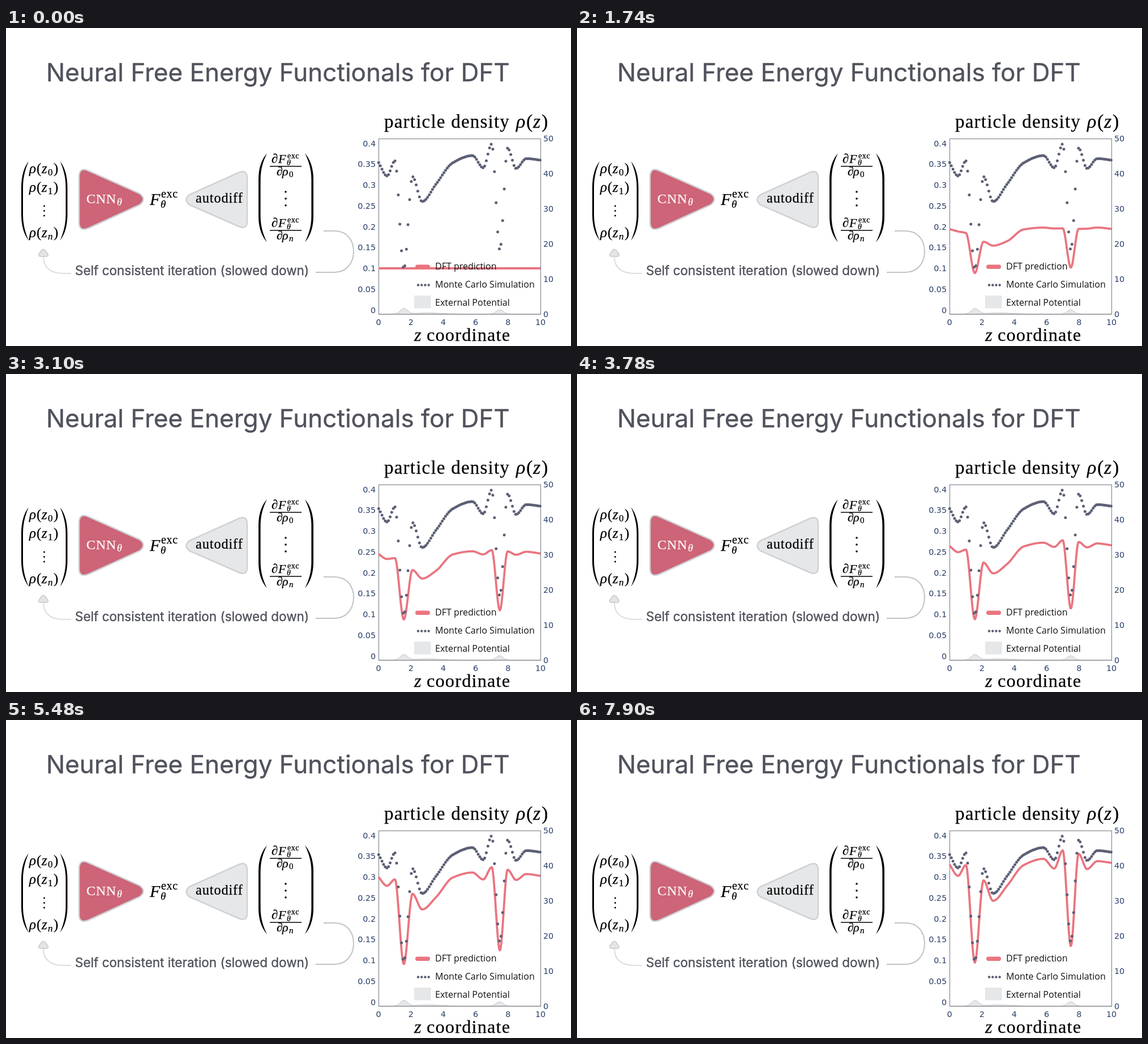
Recreate the animation shown at these times as an HTML page. Size 998 px wide and 561 px high, loop 8 s.

```html
<!DOCTYPE html>
<html lang="en">
<head>
<meta charset="utf-8">
<title>Neural Free Energy Functionals for DFT</title>
<style>
html, body { margin: 0; height: 100%; overflow: hidden; background: #fff; }
svg { display: block; width: 100vw; height: 100vh; }
.sans { font-family: Inter, sans-serif; fill: #50525c; stroke: #50525c; stroke-width: .4; }
.tick { font-family: "DejaVu Sans", sans-serif; fill: #2a3f6a; }
.key { font-family: "Open Sans", sans-serif; fill: #111; }
.rm, .it { font-family: "Liberation Serif", serif; fill: #000; stroke: #000; stroke-width: .25; }
.rm { letter-spacing: .037em; }
.it { font-style: italic; }
.white { fill: #fff; stroke: #fff; }
.end { text-anchor: end; }
.mid { text-anchor: middle; }
</style>
</head>
<body>
<svg id="stage" viewBox="0 0 998 561">
  <g stroke-width="2.5" stroke="#cfd1d4">
    <path fill="#cd6477" d="M129 263Q129 244 146 252L236 292Q249 302 236 312L146 353Q129 360 129 343Z"/>
    <path fill="#e5e7e9" d="M426 265Q426 249 411 255L324 294Q313 303 324 312L411 350Q426 356 426 341Z"/>
  </g>
  <g fill="none" stroke="#c2c3c5" stroke-width="2">
    <path d="M561 358H580C602 358 614 374 614 394S602 431 580 431H547"/>
    <path stroke="#dcdddf" d="M115 433H103C80 433 66 424 66 403"/>
    <path fill="#e3e4e6" stroke="#d0d1d3" d="M63 392Q66 389 69 392L74 399Q75 403 71 403H61Q57 403 58 399Z"/>
  </g>
  <g id="formulas"></g>
  <path id="potential" fill="#e5e7e9" stroke="#c6c8ca"/>
  <rect x="658.5" y="195.5" width="286" height="309.5" fill="none" stroke="#74777e"/>
  <path id="curve" fill="none" stroke="#ea7580" stroke-width="3.8" stroke-linejoin="round"/>
  <g id="dots" fill="#5c6075"></g>
  <rect x="723" y="417.5" width="26" height="7.5" rx="3.7" fill="#ea7580"/>
  <rect x="721" y="472" width="29.5" height="22.5" fill="#e5e7e9"/>
  <g id="labels"></g>
</svg>
<script>
const $ = id => document.getElementById(id);
const add = (id, markup) => $(id).insertAdjacentHTML('beforeend', markup);
const text = (cls, size, x, y, str, id = 'formulas') =>
  add(id, `<text class="${cls}" font-size="${size}" x="${x}" y="${y}">${str}</text>`);
const dot = (id, x, y, r) => add(id, `<circle cx="${x}" cy="${y}" r="${r}"/>`);

// Tall parenthesis bulging towards x; the tips lie at x + w
function paren(x, w, top, bottom, thick) {
  const inner = x + thick * Math.sign(w), tip = x + w, a = top + 46, b = bottom - 46;
  add('formulas', `<path d="M${tip} ${top}C${x + w * .3} ${top + 12} ${x} ${top + 28} ${x} ${a}V${b}
    C${x} ${bottom - 28} ${x + w * .3} ${bottom - 12} ${tip} ${bottom}
    C${x + w * .55} ${bottom - 14} ${inner} ${bottom - 28} ${inner} ${b}V${a}
    C${inner} ${top + 28} ${x + w * .55} ${top + 14} ${tip} ${top}"/>`);
}

// Headings and diagram
text('sans', 44.05, 71, 94, 'Neural Free Energy Functionals for DFT');
text('sans', 22.5, 122, 436, 'Self consistent iteration (slowed down)');
text('rm white', 24, 142, 309, 'CNN');
text('it white', 18, 196, 313, 'θ');
text('rm', 24.3, 335, 308, 'autodiff');
text('it', 30, 254, 312, 'F');
text('rm', 20, 274, 299, 'exc');
text('it', 19, 273, 317, 'θ');

paren(27, 13, 235, 375, 3);
paren(108.5, -13, 235, 375, 3);
[[256, '0'], [289, '1'], [369, 'n']].forEach(([y, sub]) => {
  text('it', 25, 41, y, 'ρ');
  text('rm', 25, 54, y, '(');
  text('it', 25, 63, y, 'z');
  text(sub === 'n' ? 'it' : 'rm', 17, 74, y + 4, sub);
  text('rm', 25, 84, y, ')');
});
[314, 322.5, 331].forEach(y => dot('formulas', 67.5, y, 1.5));

paren(446, 15, 221, 378, 3.6);
paren(543, -15, 221, 378, 3.6);
[[244, '0'], [357, 'n']].forEach(([y, sub]) => {
  text('it', 23, 469, y - 6, '∂');
  text('it', 22, 481, y - 6, 'F');
  text('rm', 14, 497, y - 14, 'exc');
  text('it', 14, 496, y - 2, 'θ');
  add('formulas', `<rect x="466" y="${y - .7}" width="56" height="1.5"/>`);
  text('it', 22, 478, y + 16, '∂');
  text('it', 22, 488, y + 16, 'ρ');
  text(sub === 'n' ? 'it' : 'rm', 15, 500, y + 19, sub);
});
[289, 301, 313].forEach(y => dot('formulas', 494, y, 1.8));

// Chart text
text('rm', 33, 668, 175.5, 'particle density');
text('it', 34, 901, 175.5, 'ρ');
text('rm', 34, 919, 175.5, '(');
text('it', 34, 931, 175.5, 'z');
text('rm', 34, 946, 175.5, ')');
text('it', 32.5, 721, 551.5, 'z');
text('rm', 32.3, 743, 551.5, 'coordinate');
for (let i = 0; i <= 8; i++) text('tick end', 14.3, 653, 502.5 - 36.75 * i, i * 5 / 100, 'labels');
for (let i = 0; i <= 5; i++) {
  text('tick', 14.3, 949, 510 - 62 * i, i * 10, 'labels');
  text('tick mid', 14.3, 658 + 57.2 * i, 523.5, i * 2, 'labels');
}
['DFT prediction', 'Monte Carlo Simulation', 'External Potential'].forEach((s, i) =>
  text('key', 16, 758, 425.5 + 32.2 * i, s, 'labels'));
for (let i = 0; i < 4; i++) dot('dots', 728 + 6.2 * i, 453.5, 2.2);

// Monotone cubic through the points (xs, ys)
function spline(xs, ys) {
  const n = xs.length - 1;
  const s = xs.slice(1).map((x, i) => (ys[i + 1] - ys[i]) / (x - xs[i]));
  const m = xs.map((_, i) => i === 0 ? s[0] : i === n ? s[n - 1] :
    s[i - 1] * s[i] > 0 ? 2 * s[i - 1] * s[i] / (s[i - 1] + s[i]) : 0);
  return x => {
    let i = 0;
    while (i < n - 1 && x > xs[i + 1]) i++;
    const h = xs[i + 1] - xs[i], u = (x - xs[i]) / h, v = 1 - u;
    return v * v * (1 + 2 * u) * ys[i] + u * u * (3 - 2 * u) * ys[i + 1]
      + h * u * v * (v * m[i] - u * m[i + 1]);
  };
}
function trace(f) {
  let d = '';
  for (let x = 658; x <= 944; x++) d += (d ? 'L' : 'M') + x + ' ' + f(x).toFixed(2);
  return d;
}

const bump = (x, c, w, h) => h * Math.exp(-(((x - c) / w) ** 2));
$('potential').setAttribute('d', trace(x =>
  504.5 - bump(x, 703, 9, 9.5) - bump(x, 745, 32, 2) - bump(x, 872, 8.5, 7.5)) + 'V505H658Z');

// Extremes of the profile: x, rise above the flat start, and how much of it comes late
const profile = [[658, 169, -4], [673, 149, -20], [687, 168, 24], [702.7, -4, 28],
  [718, 141, 42], [735, 105, 10], [760, 132, 22], [789, 168, -3], [824, 179, 2], [843, 162, -20],
  [858, 194, 33], [872.3, 25, 36], [886, 188, 27], [901, 161, -20], [919, 175, -5], [944, 172, 0]];
const density = s => spline(profile.map(p => p[0]),
  profile.map(([, rise, late]) => 424 - s * (rise + (s - 1) * late)));

// The simulation lies a little beyond the last prediction
const limit = density(1.11);
for (let i = 0; i < 100; i++) {
  const x = 658.3 + 2.88 * i;
  dot('dots', x.toFixed(1), limit(x).toFixed(1), 2.5);
}

// Each iteration closes a fixed share of the remaining gap
const approach = k => 1 - Math.exp(-k / 11.7);
let shown = -1;
function frame(now) {
  const t = now % 8000;
  const k = t < 7220 ? Math.max(0, Math.min(20, Math.floor((t - 40) / 340))) : Math.floor((t - 80) / 340);
  if (k !== shown) {
    shown = k;
    $('curve').setAttribute('d', trace(density(approach(k) / approach(23))));
  }
  requestAnimationFrame(frame);
}
frame(0);
</script>
</body>
</html>
```
